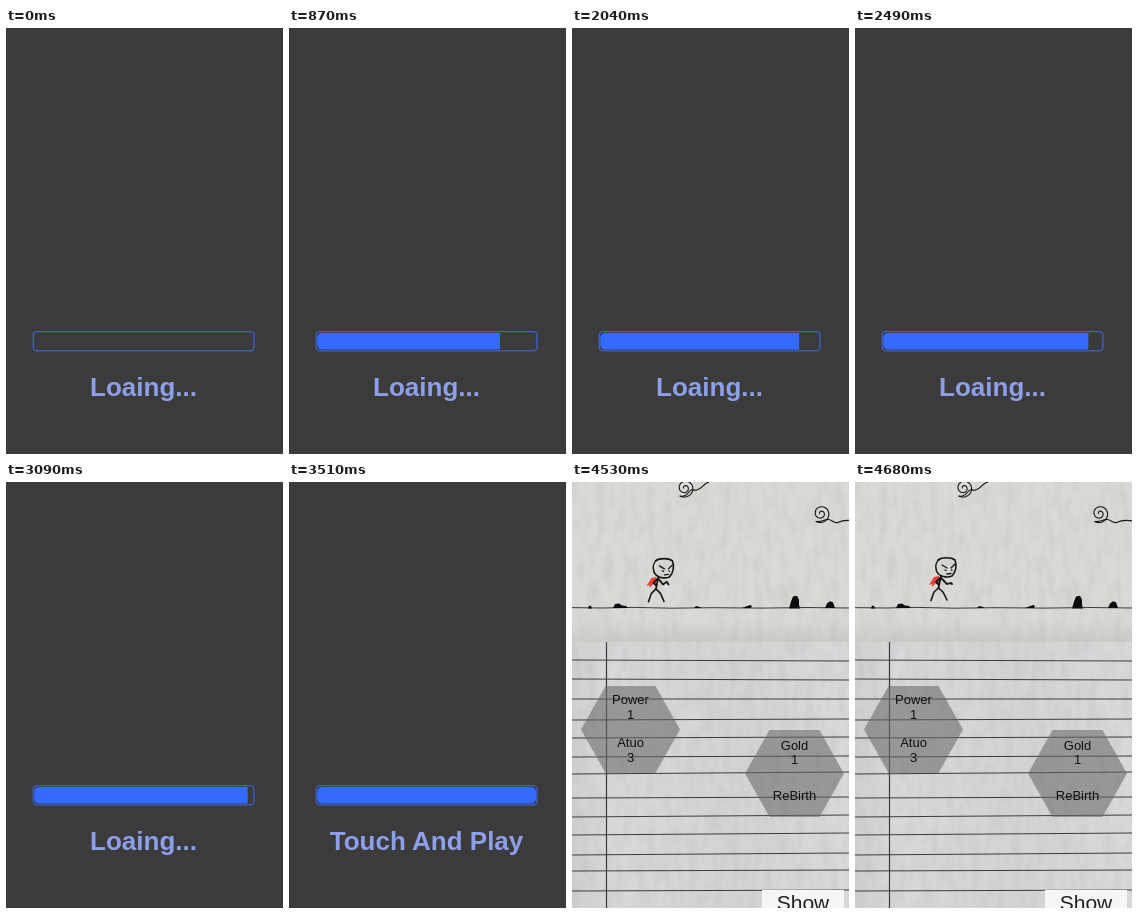
Recreate the animation shown at these times as an HTML page. Size 277 by 426 pixels, loop 4740 ms.

```html
<!DOCTYPE html>
<html lang="en">
<head>
<meta charset="utf-8">
<title>Loading and play</title>
<style>
html, body { margin: 0; width: 100%; height: 100%; overflow: hidden; background: #3b3b3b; }
svg { display: block; width: 100vw; height: 100vh; }
text { font-family: "Liberation Sans", Arial, sans-serif; text-anchor: middle; }
.caption { font-size: 26px; font-weight: bold; fill: #8d9fe8; }
.label { font-size: 13px; fill: #111; }
.ink { fill: none; stroke: #151515; stroke-linecap: round; stroke-linejoin: round; }
</style>
</head>
<body>
<svg viewBox="0 0 277 426">
  <defs>
    <clipPath id="clip"><rect id="level" x="26" y="300" width="0" height="26"/></clipPath>
    <linearGradient id="sheet">
      <stop offset="0" stop-color="#d0d0ce"/>
      <stop offset=".13" stop-color="#d8d8d6"/>
      <stop offset=".6" stop-color="#d4d4d2"/>
      <stop offset="1" stop-color="#d9d9d7"/>
    </linearGradient>
    <linearGradient id="fold" x2="0" y2="1">
      <stop offset="0" stop-color="#777" stop-opacity="0"/>
      <stop offset="1" stop-color="#777" stop-opacity=".14"/>
    </linearGradient>
    <filter id="grain" x="0" y="0" width="100%" height="100%">
      <feTurbulence type="fractalNoise" baseFrequency=".12 .04" numOctaves="2" seed="4"/>
      <feColorMatrix values="0 0 0 0 .35  0 0 0 0 .35  0 0 0 0 .35  .35 0 0 0 -.13"/>
    </filter>
  </defs>

  <g id="loading">
    <rect width="277" height="426" fill="#3b3b3b"/>
    <rect x="27.3" y="303.6" width="220.6" height="19.2" rx="3.5" fill="none" stroke="#3b62d2" stroke-width="1.3"/>
    <rect x="28.3" y="305" width="218.7" height="16.6" rx="5" fill="#346aff" clip-path="url(#clip)"/>
    <text id="caption" class="caption" x="137.5" y="368"></text>
  </g>

  <g id="game">
    <rect width="277" height="426" fill="#dad9d6"/>
    <rect y="160" width="277" height="266" fill="url(#sheet)"/>
    <rect y="138" width="277" height="22" fill="url(#fold)"/>
    <rect width="277" height="426" filter="url(#grain)"/>
    <g id="rules" stroke="#3c3c3c" stroke-width="1"></g>
    <g id="clouds">
      <g id="cloudA"><path class="ink swirl" stroke-width="1.1"/><path class="ink" stroke-width="1.1" d="M-5 8C-2 9 2 7 5 3C6 0 9 3 12 2C17 1 18-4 24-6"/></g>
      <g id="cloudB"><path class="ink swirl" stroke-width="1.1"/><path class="ink" stroke-width="1.1" d="M-5 8C1 9 5 5 8 6C12 7 13 10 17 9C21 7 27 6 36 8"/></g>
    </g>
    <path class="ink" stroke-width=".8" d="M0 125.6L30 126L62 125.4L100 126.2L140 125.7L190 126.1L235 125.5L277 126"/>
    <path fill="#0c0c0c" d="M16 126.500l1-3 2 .5 1 2.500zM41 126l2-4 4-.5 3 2 4 .5 2 2zM122 126l2-2 4 1 1 1zM170 126l4-1.500 4-1.500 2 1-1 2zM217 126.500l2-7 2-5 4-.8 2 4 0 5 1 3.800zM253 126l2-4.500 3-2.300 3 1 2 5.800z"/>
    <g id="hero">
      <path id="legs" class="ink" stroke-width="1.6"/>
      <g id="body">
        <path fill="#ee4038" d="M85 96L80 97L75 105L78 104L78 107L82 103L85 103Z"/>
        <path class="ink" stroke-width="1.8" d="M87 96L84.500 108M86 98L82 102L85 105"/>
        <path id="arm" class="ink" stroke-width="1.800"/>
        <path class="ink" stroke-width="1.6" d="M84 80C88 77 97 77 101 80C103 85 102 92 98 96C93 98 85 97 82.500 91C81 86 82 81 86 79"/>
        <path class="ink" stroke-width="1.3" d="M88 85L93 88M101 84L97 88M91 90L92 90.500M97.500 90L98 90.500M93 94L97 93.500"/>
      </g>
    </g>
    <g id="panels"></g>
    <rect x="190" y="408" width="82" height="18" fill="#f6f6f5"/>
    <text x="231" y="428" font-size="21" fill="#222">Show</text>
  </g>
</svg>
<script>
const LOOP = 4740, FILL = 870, FULL = 3510, PLAY = 4350;
const $ = id => document.getElementById(id);
const mix = (a, b, k) => a + (b - a) * k;

// Ruled paper: [left y, right y]
const rules = [[178, 179], [197, 198], [217, 217], [238, 237], [256, 255], [275, 274],
  [292, 290], [316, 315], [335, 333], [353, 351], [373, 371], [389, 388], [409, 408]];
$("rules").innerHTML = rules.map(([a, b]) => `<path d="M0 ${a}L277 ${b}"/>`).join("")
  + '<path d="M34.500 160V426" stroke-width="1.2"/>';

// Hexagon buttons with [text, baseline] rows
function panel(cx, cy, rows) {
  const points = [[-49.5, 0], [-25, -43.5], [25, -43.5], [49.5, 0], [25, 43.5], [-25, 43.5]]
    .map(([x, y]) => `${cx + x},${cy + y}`).join(" ");
  return `<polygon points="${points}" fill="#686868" fill-opacity=".57"/>`
    + rows.map(([s, y]) => `<text class="label" x="${cx}" y="${y}">${s}</text>`).join("");
}
$("panels").innerHTML =
  panel(58.5, 247.5, [["Power", 222], ["1", 237], ["Atuo", 265], ["3", 280]]) +
  panel(222.5, 291.5, [["Gold", 268], ["1", 282], ["ReBirth", 318]]);

// Spiral from the centre out to the lower left
let swirl = "";
for (let i = 0; i <= 60; i++) {
  const k = i / 60, a = -3.1 + k * 11.45, r = 1.2 + k * 8.2;
  swirl += (i ? "L" : "M") + (r * Math.cos(a)).toFixed(2) + " " + (r * Math.sin(a)).toFixed(2);
}
document.querySelectorAll(".swirl").forEach(p => p.setAttribute("d", swirl));

function drawLoading(t) {
  const edge = t < FILL ? 26 : t < FULL ? mix(211, 247.4, (t - FILL) / (FULL - FILL)) : 248;
  $("level").setAttribute("width", edge - 26);
  $("caption").textContent = t < FULL ? "Loaing..." : "Touch And Play";
}

function drawGame(t) {
  const k = t / 330, lift = -2 * k;
  $("cloudA").setAttribute("transform", `translate(${118 - 9.3 * k} 6)`);
  $("cloudB").setAttribute("transform", `translate(${254 - 9.3 * k} 31.500)`);
  $("body").setAttribute("transform", `translate(${-k} ${lift})`);
  $("arm").setAttribute("d", `M87 98L${mix(90, 93, k)} ${mix(103, 104, k)}L${mix(93, 97, k)} ${mix(98, 103, k)}L${mix(96, 98, k)} ${mix(103, 104, k)}`);
  const hip = `${84.5 - k} ${108 + lift}`;
  $("legs").setAttribute("d", `M${mix(77, 76, k)} ${mix(121.5, 118.5, k)}L${mix(80, 79, k)} ${mix(113, 110, k)}L${hip}L${mix(89, 88, k)} ${mix(113, 110, k)}L92 ${mix(121, 118, k)}`);
}

function draw(t) {
  const playing = t >= PLAY;
  $("loading").style.display = playing ? "none" : "";
  $("game").style.display = playing ? "" : "none";
  playing ? drawGame(t - PLAY) : drawLoading(t);
}

const start = performance.now();
function tick() {
  draw((performance.now() - start) % LOOP);
  requestAnimationFrame(tick);
}
tick();
</script>
</body>
</html>
```
